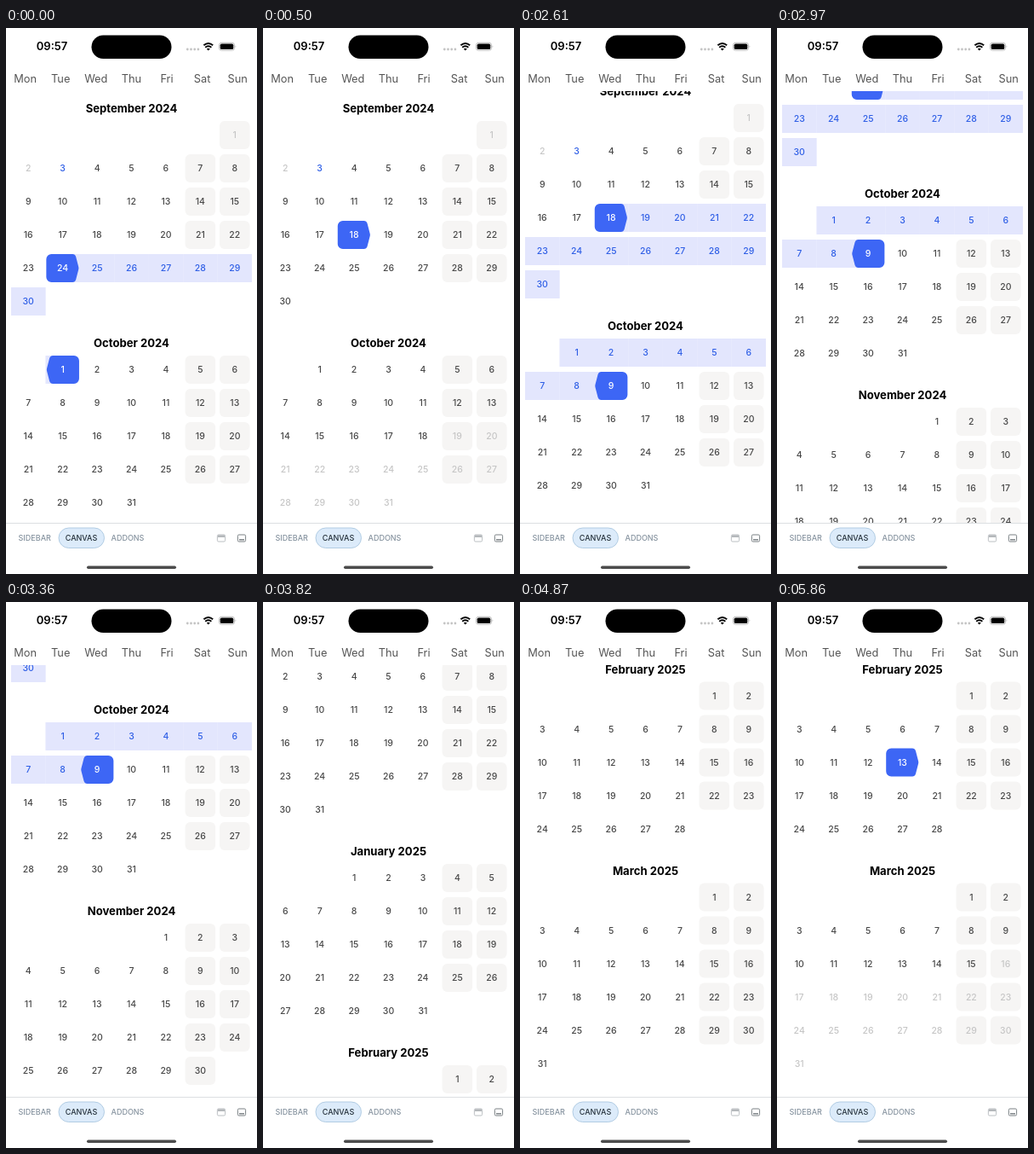
An HTML page for the animation above (8000 ms loop, 295 by 640 pixels).

```html
<!DOCTYPE html>
<html lang="en">
<head>
<meta charset="utf-8">
<title>Date range calendar</title>
<style>
  html, body { margin: 0; height: 100%; overflow: hidden; background: #fff; }
  svg { display: block; width: 295px; height: 640px; }
  text { font-family: Inter, Roboto, sans-serif; text-anchor: middle; }
  .day { font-size: 10.5px; font-weight: 500; fill: #484848; }
  .off { fill: #c6c6c6; }
  .blue { fill: #2f5fe6; }
  .picked { fill: #fff; }
  .title { font-size: 13.1px; font-weight: 700; fill: #000; }
  .week { font-size: 12.8px; fill: #555; }
  .tab { font-size: 9px; font-weight: 500; fill: #8794a0; }
</style>
</head>
<body>
<svg viewBox="0 0 295 640">
  <defs><clipPath id="view"><rect y="74" width="295" height="507"/></clipPath></defs>
  <g clip-path="url(#view)"><g id="list"></g></g>
  <g id="week"></g>

  <text x="54" y="26.4" font-size="13" font-weight="600">09:57</text>
  <rect x="100.5" y="8.5" width="94" height="27.5" rx="13.75"/>
  <g fill="#c4c4c4">
    <circle cx="213.3" cy="25" r="1.4"/><circle cx="217.5" cy="25" r="1.4"/>
    <circle cx="221.7" cy="25" r="1.4"/><circle cx="225.9" cy="25" r="1.4"/>
  </g>
  <g fill="none" stroke="#000" stroke-width="1.9">
    <path d="M232.4 20.3q5.4-4.6 10.8 0M234.2 22.7q3.6-2.9 7.2 0"/>
  </g>
  <path d="M235.8 24.4q2-1.5 4 0l-2 2.1z"/>
  <rect x="250.5" y="17.3" width="18" height="9" rx="2.8" fill="none" stroke="#aaa" stroke-width=".8"/>
  <rect x="251.7" y="18.5" width="15.6" height="6.6" rx="1.7"/>
  <path d="M269.6 20.3q1.6 1.5 0 3z" fill="#aaa"/>

  <path d="M0 580.5H295" stroke="#dcdfe2"/>
  <rect x="62" y="586" width="53.5" height="23.5" rx="11.75" fill="#dcebfa" stroke="#abc8e0" stroke-width=".9"/>
  <text class="tab" x="33.7" y="601.2">SIDEBAR</text>
  <text class="tab" x="88.5" y="601.2" style="fill:#26323c">CANVAS</text>
  <text class="tab" x="143" y="601.2">ADDONS</text>
  <g fill="none" stroke-width=".9">
    <rect x="248.4" y="594" width="9.2" height="8" rx="1.4" stroke="#b4b8bb"/>
    <path d="M249 595.7h8" stroke="#b4b8bb" stroke-width="2.6"/>
    <rect x="272.4" y="594" width="9.2" height="8" rx="1.4" stroke="#6c7378"/>
    <path d="M274 599.8h6" stroke="#6c7378" stroke-width="1.3"/>
  </g>
  <rect x="95" y="630.5" width="105" height="3.4" rx="1.7" fill="#4c4c4c"/>
</svg>
<script>
const LOOP = 8000, COL = 283 / 7, ROW = 39, TODAY = 3, MAX_SPAN = 30;
const list = document.getElementById('list');

// first weekday counts from Monday = 0
const months = [
  ['September 2024', 30, 6], ['October 2024', 31, 1], ['November 2024', 30, 4],
  ['December 2024', 31, 6], ['January 2025', 31, 2], ['February 2025', 28, 5],
  ['March 2025', 31, 5]
];

// [shown until, start, end], in days counted from 1 September = 1
const picks = [[500, 24, 31], [1760, 18, 0], [5860, 18, 39], [LOOP, 166, 0]];

// [first step, last step, steps, from, to, decay, drag]
const flicks = [
  [2610, 3170, 6, 0, 193.2, 3, 2.62],
  [3360, 4020, 7, 193.2, 864.2, 3, 2.62],
  [4180, 4870, 7, 864.2, 1273.5, 5, 2.073]
];

const text = (cls, x, y, size, s) =>
  `<text class="${cls}" x="${x}" y="${y + size * .364}">${s}</text>`;
const box = (x, y, w, fill, r = 0) =>
  `<rect x="${x}" y="${y - 16.5}" width="${w}" height="33" rx="${r}" fill="${fill}"/>`;
const knob = (x, y, dir) =>
  `<path transform="translate(${x} ${y}) scale(${dir} 1)" fill="#3d66f5" d="M-13.3-16.5H11.5q3 0 4 3L18.6-1.5
   q.4 1.5 0 3L15.5 13.5q-1 3-4 3H-13.3a6 6 0 0 1-6-6V-10.5a6 6 0 0 1 6-6z"/>`;

function dayCell(n, label, col, y, start, end) {
  const left = 6 + col * COL, x = left + COL / 2, tint = '#e3e6fd';
  const ranged = end && n >= start && n <= end;
  const off = n < TODAY - 0 || (!end && n > start + MAX_SPAN);
  let out = '', cls = off ? 'off' : n === TODAY || ranged ? 'blue' : '';
  if (n === start || n === end) {
    cls = 'picked';
    if (end) out += box(n === start ? x : left, y, COL / 2 + .1, tint);
    out += knob(x, y, n === start ? 1 : -1);
  } else if (ranged) {
    out += box(left, y, COL + (col < 6 ? .2 : 0), tint);
  } else if (col > 4) {
    out += box(x - 17.8, y, 35.6, '#f6f5f4', 6);
  }
  return out + text('day ' + cls, x, y, 10.5, label);
}

function calendar(start, end) {
  let top = 94.5, n = 0, out = '';
  for (const [name, days, first] of months) {
    out += text('title', 147.5, top, 13.1, name);
    for (let d = 1; d <= days; d++) {
      const slot = first + d - 1;
      out += dayCell(++n, d, slot % 7, top + 31 + ROW * Math.floor(slot / 7), start, end);
    }
    top += 41 + ROW * Math.ceil((first + days) / 7);
  }
  return out;
}

function scrollAt(t) {
  let y = 0;
  for (const [t0, t1, steps, from, to, decay, drag] of flicks) {
    if (t < t0) break;
    const step = Math.min(steps, 1 + Math.floor((t - t0) / (t1 - t0) * (steps - 1)));
    y = from + (to - from) * (1 - (1 - step / steps) ** decay) ** drag;
  }
  return Math.round(y * 2) / 2;
}

document.getElementById('week').innerHTML = ['Mon', 'Tue', 'Wed', 'Thu', 'Fri', 'Sat', 'Sun']
  .map((s, i) => text('week', 22.6 + i * 41.6, 59.5, 12.8, s)).join('');

let shown;
const origin = performance.now();
function draw(now) {
  const t = Math.max(0, now - origin) % LOOP;
  const pick = picks.find(p => t < p[0]);
  if (pick !== shown) {
    shown = pick;
    list.innerHTML = calendar(pick[1], pick[2]);
  }
  list.setAttribute('transform', `translate(0 ${-scrollAt(t)})`);
  requestAnimationFrame(draw);
}
draw(origin);
</script>
</body>
</html>
```
